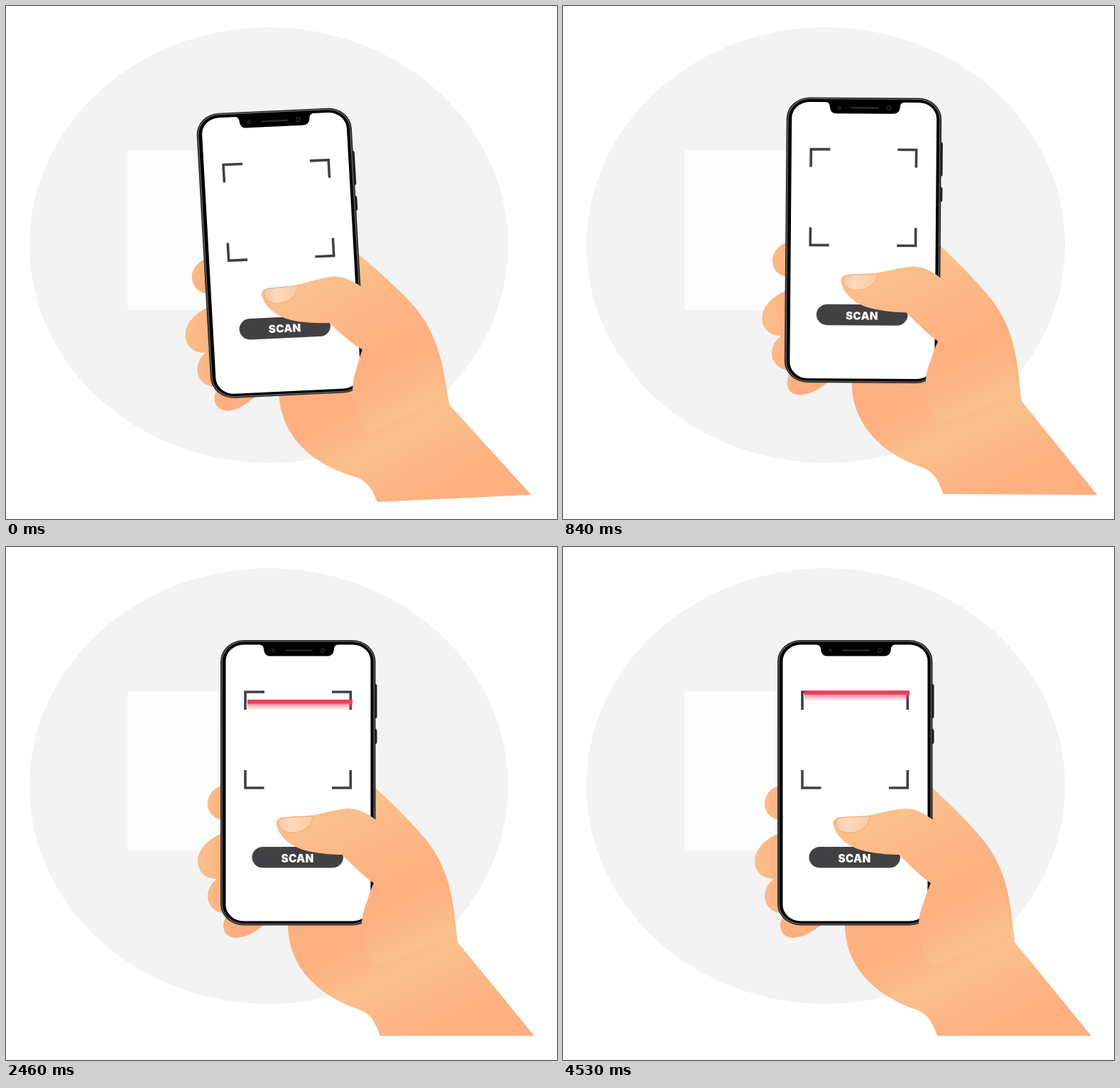
Write an HTML page that moves like this. It is 776 px wide and 722 px high and loops after 4560 ms.

```html
<!DOCTYPE html>
<html lang="en">
<head>
<meta charset="utf-8">
<style>
  html, body { margin: 0; width: 100%; height: 100%; overflow: hidden; background: #fff; }
  svg { display: block; }
</style>
</head>
<body>
<svg width="776" height="722" viewBox="0 0 776 722">
  <defs>
    <linearGradient id="arm" gradientUnits="userSpaceOnUse" x1="450" y1="389" x2="606" y2="702">
      <stop offset="0" stop-color="#fabf8b"/>
      <stop offset=".33" stop-color="#ffb080"/>
      <stop offset=".5" stop-color="#ffb080"/>
      <stop offset=".67" stop-color="#f9c08d"/>
      <stop offset=".93" stop-color="#ffb080"/>
    </linearGradient>
    <linearGradient id="thumb" gradientUnits="userSpaceOnUse" x1="450" y1="389" x2="606" y2="702">
      <stop offset="0" stop-color="#fabf8b"/>
      <stop offset=".33" stop-color="#ffb080"/>
      <stop offset=".42" stop-color="#ffb080"/>
      <stop offset=".61" stop-color="#f9c08d"/>
    </linearGradient>
    <linearGradient id="finger" gradientUnits="userSpaceOnUse" x1="272" y1="0" x2="335" y2="0">
      <stop offset="0" stop-color="#fabf8b"/>
      <stop offset=".75" stop-color="#ffae7f"/>
    </linearGradient>
    <linearGradient id="nail">
      <stop offset="0" stop-color="#f9c9a2"/>
      <stop offset=".35" stop-color="#fcdabd"/>
      <stop offset="1" stop-color="#fbc9a0"/>
    </linearGradient>
    <linearGradient id="laser" x2="0" y2="1">
      <stop offset="0" stop-color="#e83a58"/>
      <stop offset=".36" stop-color="#ee4562"/>
      <stop offset=".42" stop-color="#f05a74" stop-opacity=".6"/>
      <stop offset="1" stop-color="#f05a74" stop-opacity="0"/>
    </linearGradient>
    <clipPath id="crop"><path d="M0 0H755.5V722H0Z"/></clipPath>
  </defs>

  <ellipse cx="370" cy="336.5" rx="337" ry="306.5" fill="#f3f3f3"/>
  <rect x="171" y="203" width="247" height="225" rx="3" fill="#fcfcfc"/>

  <g clip-path="url(#crop)">
    <g id="scene">
      <path fill="url(#finger)" d="M310 334C294 337 284 348 284 361C284 374 293 384 310 385Z
        M312 400C290 407 270 423 270 442C270 458 282 467 297 467C288 474 284 483 284 492
        C285 506 294 515 312 516Z
        M310 520C303 530 304 550 325 550C340 549 352 541 366 530Z"/>
      <path fill="url(#arm)" d="M512 331C545 362 575 391 593 414C622 451 629 490 633 530L636 556L744 688H527
        C520 668 513 658 500 652C438 631 396 590 397 528L512 500Z"/>

      <path fill="#1c1d1f" d="M518 193H521Q522.5 193 522.5 196V238Q522.5 241 521 241H518Z
        M518 256H521Q522.5 257 522.5 259V274Q522.5 277 521 277H518Z"/>
      <rect x="302" y="131" width="218.5" height="401.5" rx="33" ry="30" fill="#242527"/>
      <rect x="304.2" y="133" width="214" height="397.5" rx="31" ry="28" fill="#000" stroke="#6a6d70" stroke-width="1.2"/>
      <rect x="309.5" y="137.5" width="204" height="389" rx="25" ry="23" fill="#fff"/>
      <path d="M355 136.5C361 138 363 140 363 144C364 151 367 153.5 372 153.5H452C458 153.5 461 151 462 144
        C462 140 464 138 469 136.5Z"/>
      <path d="M394 145.5H431" stroke="#303133" stroke-width="2" stroke-linecap="round"/>
      <g fill="#0c0c0e" stroke="#303133"><circle cx="376.5" cy="145.5" r="2"/><circle cx="446" cy="145.5" r="3"/></g>

      <path fill="none" stroke="#414042" stroke-width="3.6"
        d="M337 229V204H364M459 204H485.3V229M337 314V339H363.5M459 339H485.3V314"/>
      <rect x="346.5" y="422" width="128.5" height="29.5" rx="15.5" ry="14.7" fill="#414042"/>
      <text x="410.5" y="443.5" text-anchor="middle" fill="#fff" font-family="Inter, sans-serif"
        font-size="15.3" font-weight="900" letter-spacing=".2">SCAN</text>
      <rect id="bar" x="340" width="148" height="15" fill="url(#laser)"/>

      <path fill="url(#thumb)" d="M521 384C508 374 494 367 478 368.5C455 371 440 377 425 378.5L392 380
        C382 381 379 386 381 392C387 412 405 424 430 429C447 432 460 433 473 433C487 446 500 461 518 473
        C514 481 511 490 508 500C504 510 501 520 501 533C502 555 508 575 520 590L634 545L620 475L580 430Z"/>
      <path fill="url(#nail)" stroke="#eda274" stroke-width=".8" d="M387 382C400 379.5 415 380 433 378.5
        C430 391 421 402 404 402C392 402 384 397 384 388Q384 384 387 382Z"/>
    </g>
  </g>
</svg>
<script>
  const LOOP = 4560;
  const STRETCH = 1.1; // the artwork is widened, so tilting happens before widening
  const scene = document.getElementById("scene");
  const bar = document.getElementById("bar");

  // [time, centre x, centre y, tilt in degrees]
  const poses = [[0, 383.75, 287.5, -2.93], [540, 437.7, 266.9, 0.97], [1100, 411, 271.5, 0]];
  // [time, bar top]
  const sweeps = [[957, 202], [1628, 326], [1690, 326], [2664, 202], [3618, 326], [4548, 202]];

  const ease = p => (1 - Math.cos(Math.PI * p)) / 2;

  function sample(keys, t) {
    const next = keys.findIndex(key => key[0] > t);
    if (next < 0) return keys[keys.length - 1].slice(1);
    if (next === 0) return keys[0].slice(1);
    const [a, b] = [keys[next - 1], keys[next]];
    const p = ease((t - a[0]) / (b[0] - a[0]));
    return a.slice(1).map((v, i) => v + (b[i + 1] - v) * p);
  }

  function draw(now) {
    const t = now % LOOP;
    const [x, y, tilt] = sample(poses, t);
    scene.setAttribute("transform",
      `translate(${x} ${y}) scale(${STRETCH} 1) rotate(${tilt}) scale(${1 / STRETCH} 1) translate(-411 -271.5)`);
    bar.setAttribute("y", sample(sweeps, t)[0]);
    bar.setAttribute("visibility", t < sweeps[0][0] ? "hidden" : "visible");
    requestAnimationFrame(draw);
  }
  draw(performance.now());
</script>
</body>
</html>
```
